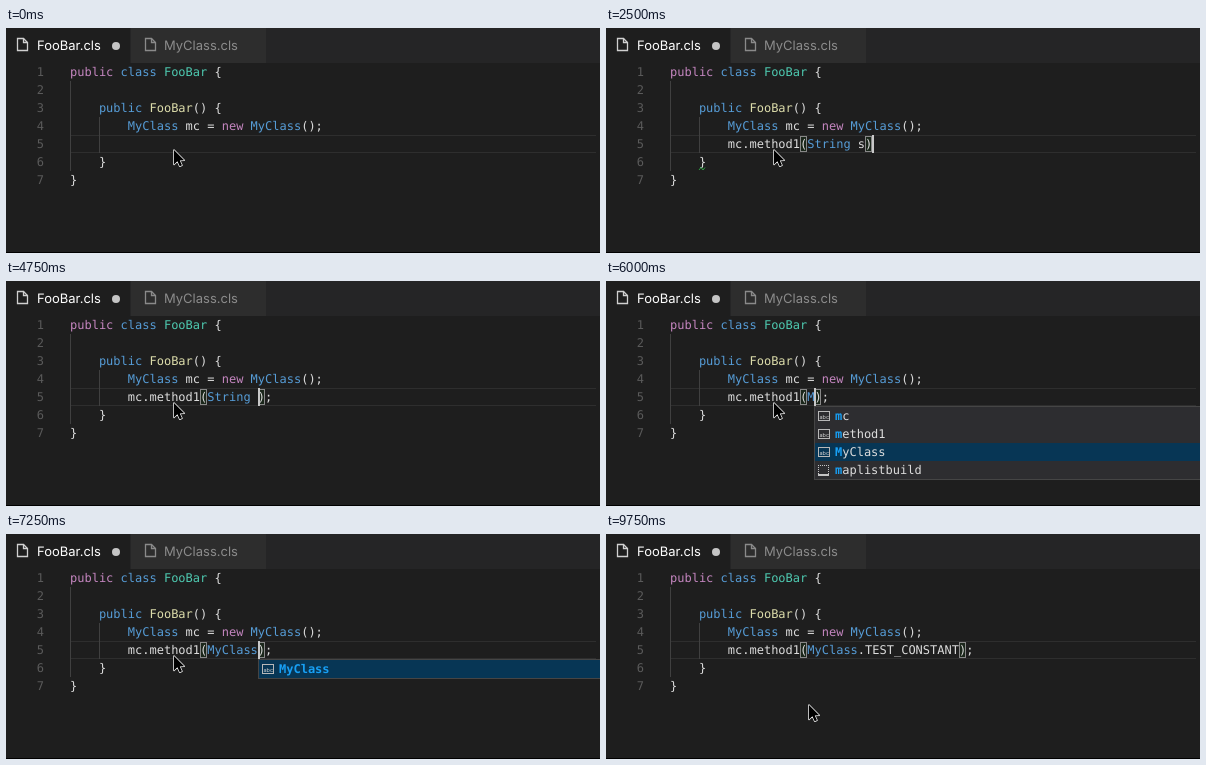
These frames come from a looping animation (594 by 225 pixels, 10000 ms). An HTML page with a canvas:

```html
<!DOCTYPE html>
<html lang="en">
<head>
<meta charset="utf-8">
<title>Code completion</title>
<style>
html, body { margin: 0; width: 100%; height: 100%; overflow: hidden; background: #1e1e1e; }
canvas { display: block; width: 594px; height: 225px; }
</style>
</head>
<body>
<canvas id="stage" width="594" height="225"></canvas>
<script>
const ctx = document.getElementById('stage').getContext('2d');
const LOOP = 10000, CHAR = 7.224, LEFT = 64, LINE = 18, TOP = 35;
const MONO = '"DejaVu Sans Mono", monospace', SANS = 'Inter, sans-serif';
const C = {
  text: '#dcdcdc', blue: '#569cd6', pink: '#c586c0', teal: '#4ec9b0',
  sand: '#dcdcaa', match: '#18a0f5', green: '#2f9e44', panel: '#252526'
};

const code = [
  [['public ', C.pink], ['class ', C.blue], ['FooBar', C.teal], [' {', C.text]],
  [],
  [['    public ', C.blue], ['FooBar', C.sand], ['() {', C.text]],
  [['        MyClass', C.blue], [' mc = ', C.text], ['new ', C.pink], ['MyClass', C.blue], ['();', C.text]],
  [],
  [['    }', C.text]],
  [['}', C.text]]
];

// Popup rows: icon, label, matched letters, description
const word = (label, hit) => ['abc', label, hit];
const members = {
  sel: 0,
  rows: [
    ['cube', 'method1(String s): Boolean', 0, 'A method that does really cool stuff!'],
    ['wrench', 'myProperty: String', 0]
  ]
};
const words = sel => ({
  sel, rows: [word('mc', 1), word('method1', 1), word('MyClass', 1), ['snippet', 'maplistbuild', 1]]
});
const one = (label, hit) => ({ sel: 0, rows: [word(label, hit)] });
const statics = { sel: 0, rows: [['wrench', 'TEST_CONSTANT: String', 0, 'A constant for testing']] };

// Time, typed text ("|" caret shown, "~" caret hidden), popup
const call = arg => 'mc.method1(' + arg;
const steps = [
  [0, '~'],
  [500, 'mc|', one('mc', 2)],
  [1000, 'mc.|', members],
  [1500, 'mc.~', members],
  [2000, 'mc.|', members],
  [2500, call('String s)|')],
  [3250, call('String s)~')],
  [3750, call('String s);|')],
  [4250, call('String s)|;')],
  [4500, call('String s|);')],
  [4750, call('String |);')],
  [5000, call('Str|);')],
  [5250, call('|);')],
  [5750, call('M|);'), words(0)],
  [6000, call('M|);'), words(2)],
  [6250, call('My|);'), one('MyClass', 2)],
  [6750, call('MyCl|);'), one('MyClass', 4)],
  [7000, call('MyClas|);'), one('MyClass', 6)],
  [7250, call('MyClass|);'), one('MyClass', 7)],
  [7750, call('MyClass.|);'), statics],
  [8250, call('MyClass.~);'), statics],
  [8500, call('MyClass.TEST_CONSTANT|);')],
  [9500, call('MyClass.TEST_CONSTANT~);')]
];
const pointer = [
  [0, 167, 121], [8750, 170, 124], [9000, 178, 132],
  [9250, 189, 143], [9500, 199, 161], [9750, 202, 170]
];

const at = (list, t) => list.findLast(s => s[0] <= t);
const colX = col => LEFT + col * CHAR;
const lineY = n => TOP + (n - 1) * LINE;

function rect(x, y, w, h, color) {
  ctx.fillStyle = color;
  ctx.fillRect(x, y, w, h);
}

function frame(x, y, w, h, color) {
  ctx.strokeStyle = color;
  ctx.lineWidth = 1;
  ctx.strokeRect(x + .5, y + .5, w - 1, h - 1);
}

function path(points, color, close) {
  ctx.beginPath();
  points.forEach(([x, y]) => ctx.lineTo(x, y));
  if (close) ctx.closePath();
  ctx.strokeStyle = color;
  ctx.stroke();
}

function disc(x, y, r, color) {
  ctx.beginPath();
  ctx.arc(x, y, r, 0, 7);
  ctx.fillStyle = color;
  ctx.fill();
}

function label(s, x, y, size, color) {
  ctx.font = size + 'px ' + SANS;
  ctx.fillStyle = color;
  ctx.fillText(s, x, y);
}

// Draws on the fixed character grid and returns the next x
function mono(s, x, y, color, bold) {
  ctx.font = (bold ? 'bold ' : '') + '12px ' + MONO;
  ctx.fillStyle = color;
  for (const ch of s) {
    ctx.fillText(ch, x, y);
    x += CHAR;
  }
  return x;
}

function squiggle(x, y, w) {
  ctx.lineWidth = 1;
  const points = [];
  for (let i = 0; i <= w; i += 2) points.push([x + i, y + (i % 4 ? 0 : 2.5)]);
  path(points, C.green);
}

function pageIcon(x, color) {
  ctx.lineWidth = 1.3;
  path([[x, 10.5], [x + 6, 10.5], [x + 10, 14.5], [x + 10, 22.5], [x, 22.5]], color, true);
  path([[x + 6, 10.5], [x + 6, 14.5], [x + 10, 14.5]], color);
}

function tabs() {
  rect(0, 0, 594, 35, C.panel);
  rect(0, 0, 124, 35, '#1e1e1e');
  rect(125, 0, 135, 35, '#2d2d2d');
  pageIcon(11.5, '#d0d0d0');
  pageIcon(139.5, '#8a8a8a');
  label('FooBar.cls', 31, 21.5, 13, '#ffffff');
  label('MyClass.cls', 158, 21.5, 13, '#8c8c8c');
  disc(110, 18, 4, '#c5c5c5');
}

const icons = {
  cube(x, y) {
    ctx.lineWidth = 1.2;
    path([[x + 6, y - 6], [x + 11, y - 3.5], [x + 11, y + 3], [x + 6, y + 6], [x + 1, y + 3], [x + 1, y - 3.5]], '#c08bd0', true);
    path([[x + 1, y - 3.5], [x + 6, y - 1], [x + 11, y - 3.5]], '#c08bd0');
    path([[x + 6, y - 1], [x + 6, y + 6]], '#c08bd0');
  },
  wrench(x, y) {
    ctx.lineWidth = 2.8;
    path([[x + 1.5, y + 5], [x + 7, y - 1]], '#c5c5c5');
    ctx.lineWidth = 2.4;
    ctx.beginPath();
    ctx.arc(x + 8.5, y - 2.5, 2.6, -.2, 4.9);
    ctx.stroke();
  },
  abc(x, y) {
    frame(x, y - 5, 12, 10, '#b8b8b8');
    label('abc', x + 1.5, y + 2.5, 5.5, '#d0d0d0');
  },
  snippet(x, y) {
    for (let i = 0; i < 12; i += 2) {
      rect(x + i, y - 5, 1, 1, '#c5c5c5');
      rect(x, y - 5 + i, 1, 1, '#c5c5c5');
      rect(x + 10, y - 5 + i, 1, 1, '#c5c5c5');
    }
    rect(x, y + 4, 11, 2, '#c5c5c5');
  }
};

function popup({ rows, sel }, x) {
  const top = 125, wide = 440;
  const tall = 2 + rows.reduce((h, r) => h + (r[3] ? 36 : 18), 0);
  rect(x, top, wide, tall, '#2d2d30');
  let y = top + 1;
  rows.forEach(([icon, name, hit, doc], i) => {
    const h = doc ? 36 : 18;
    if (i === sel) rect(x + 1, y, wide - 2, h, '#073655');
    icons[icon](x + 4, y + 9);
    const next = mono(name.slice(0, hit), x + 21, y + 13, C.match, true);
    mono(name.slice(hit), next, y + 13, C.text);
    if (doc) {
      label(doc, x + 21, y + 31, 12, '#a9b7c1');
      disc(x + 420, y + 27, 5, '#1b80b2');
      rect(x + 419.3, y + 26, 1.4, 4, '#073655');
      rect(x + 419.3, y + 23.6, 1.4, 1.4, '#073655');
    }
    y += h;
  });
  frame(x, top, wide, tall, '#454545');
}

function arrow(x, y) {
  const shape = [[1, 1], [1, 15.5], [4.4, 12.3], [6.7, 17.3], [9, 16.3], [6.8, 11.5], [11.2, 11.3]];
  ctx.lineWidth = 1.4;
  ctx.lineJoin = 'round';
  path(shape.map(([a, b]) => [x + a, y + b]), '#ffffff', true);
  ctx.fillStyle = '#000000';
  ctx.fill();
  ctx.lineJoin = 'miter';
}

function typed(source, t) {
  const caret = source.search(/[|~]/);
  const s = source.replace(/[|~]/, '');
  const open = s.indexOf('('), shut = s.indexOf(')');
  const y = lineY(5);

  if (shut >= 0 && [open, open + 1, shut, shut + 1].includes(caret)) {
    for (const i of [open, shut]) {
      const x = Math.round(colX(8 + i));
      rect(x, y + 1, 7, 16, 'rgba(0,100,0,.12)');
      frame(x, y + 1, 7, 16, '#888888');
    }
  }
  let x = colX(8);
  for (const part of s.split(/((?<!\.)\b[A-Z]\w*)/)) {
    const type = /^[A-Z]/.test(part);
    x = mono(part, x, y + 13, type ? C.blue : C.text);
  }
  if (t >= 2750 && t < 3750) squiggle(252, y + 14.5, 14);

  const caretX = Math.round(colX(8 + caret));
  if (source.includes('|')) rect(caretX, y, 2, LINE, '#c8c8c8');
  return caretX;
}

function draw(t) {
  rect(0, 0, 594, 225, '#1e1e1e');
  tabs();

  rect(64, lineY(5), 526, 1, '#2e2e2e');
  rect(64, lineY(6) - 1, 526, 1, '#2e2e2e');
  rect(64, lineY(2), 1, 5 * LINE, '#404040');
  rect(93, lineY(4), 1, 2 * LINE, '#404040');

  code.forEach((parts, i) => {
    const y = lineY(i + 1) + 13;
    mono(String(i + 1), 30.8, y, '#5a5a5a');
    let x = LEFT;
    for (const [s, color] of parts) x = mono(s, x, y, color);
  });
  if (t >= 500 && t < 3750) squiggle(93, lineY(6) + 14.5, 7);

  const [, text, menu] = at(steps, t);
  const caretX = typed(text, t);
  if (menu) popup(menu, caretX);
  rect(0, 224, 594, 1, '#000000');

  const [, px, py] = at(pointer, t);
  arrow(px, py);
}

ctx.textRendering = 'geometricPrecision';
const start = performance.now();
function tick() {
  draw((performance.now() - start) % LOOP);
  requestAnimationFrame(tick);
}
tick();
</script>
</body>
</html>
```
